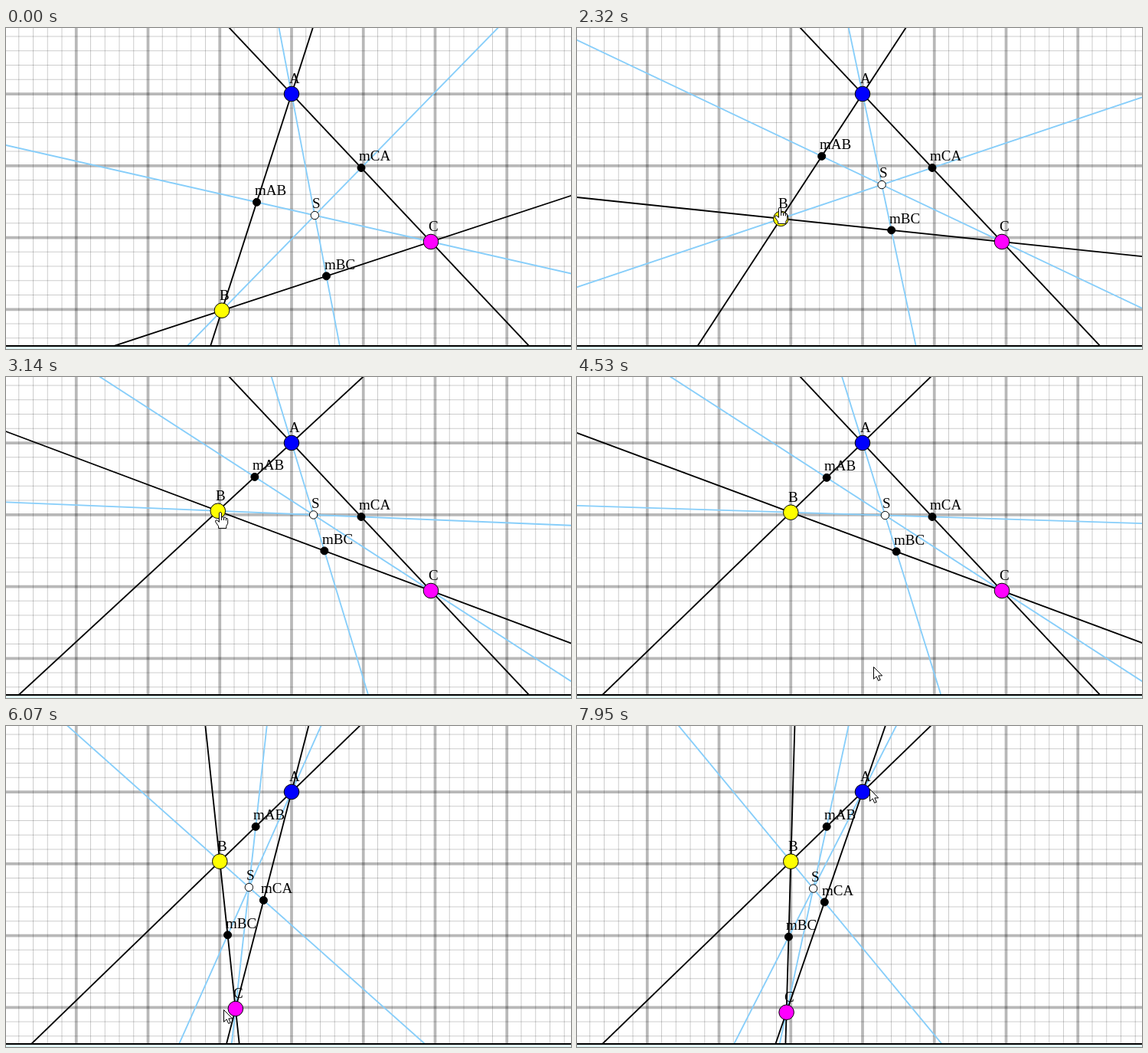
An HTML page with a canvas for the animation above (8000 ms loop, 738 by 419 pixels).

```html
<!DOCTYPE html>
<html lang="en">
<head>
<meta charset="utf-8">
<title>Medians of a triangle</title>
<style>
html, body { margin: 0; width: 100%; height: 100%; overflow: hidden; background: #fff; }
canvas { display: block; }
</style>
</head>
<body>
<canvas id="stage" width="738" height="419"></canvas>
<script>
const W = 738, H = 419, FLOOR = 414, LOOP = 8000, SKY = '#87cefa';
const ctx = document.getElementById('stage').getContext('2d');

const A = [373, 86];

// Each move takes n even steps along a path; moves of B and C are eased drags.
const moves = [
  { from: 900, to: 1340, n: 7, path: [[470, 406], [318, 359], [284, 371]] },
  { from: 1650, hand: true, path: [[284, 362]] },
  { drag: 'B', from: 1960, to: 2760, n: 12, hand: true, path: [[282.9, 369.7], [255.2, 167.3]] },
  { drag: 'B', from: 2840, hand: true, path: [[258, 166.5]] },
  { drag: 'B', from: 2980, to: 3200, n: 4, hand: true, path: [[266.3, 166.8], [279.3, 176.7]] },
  { from: 3360, to: 4160, n: 12, path: [[286, 180], [430, 235], [570, 291], [542, 273]] },
  { from: 4390, to: 4679, n: 5, path: [[500, 303], [387, 378], [300, 390]] },
  { from: 4751, to: 5040, n: 5, path: [[330, 368], [430, 320], [542, 280]] },
  { drag: 'C', from: 5180, to: 5910, n: 11, hand: true, path: [[552, 280], [335, 364]] },
  { drag: 'C', from: 5990, to: 6210, n: 4, path: [[329, 366.5], [265, 372]] },
  { drag: 'C', from: 6440, to: 6520, n: 2, hand: true, path: [[265.5, 372], [267.5, 372.6]] },
  { drag: 'C', from: 6670, hand: true, path: [[273.6, 373.7]] },
  { from: 6980, to: 7280, n: 5, path: [[290, 340], [330, 215], [363, 69]] },
  { from: 7420, to: 7493, n: 2, path: [[354, 72], [351, 78]] },
  { from: 7567, hand: true, path: [[370, 85]] },
  { from: 7640, path: [[384, 80]] },
  { from: 7950, path: [[382, 82]] }
];

// Catmull-Rom curve through the path, u from 0 to 1
function along(path, u) {
  const last = path.length - 1;
  const i = Math.min(Math.floor(u * last), last - 1), f = u * last - i;
  const p = j => path[Math.max(0, Math.min(last, j))];
  if (last < 2) return p(0).map((v, d) => v + (p(last)[d] - v) * u);
  return [0, 1].map(d => {
    const [a, b, c, e] = [p(i - 1)[d], p(i)[d], p(i + 1)[d], p(i + 2)[d]];
    return b + f / 2 * (c - a + f * (2 * a - 5 * b + 4 * c - e + f * (3 * (b - c) + e - a)));
  });
}

const easeOut = u => 1 - (1 - u) ** 1.5;

function stateAt(t) {
  const state = { B: [282, 368.7], C: [555, 279], cursor: null, hand: false };
  for (const { drag, from, to, n = 1, path, hand } of moves) {
    if (t < from) break;
    const gap = n > 1 ? (to - from) / (n - 1) : 1;
    const step = Math.min(n - 1, Math.floor((t - from + 6) / gap));
    const u = k => n > 1 ? Math.min(1, k / (n - 1)) : 0;
    state.hand = hand;
    if (drag) {
      // the pointer runs ahead of the point it drags
      const [x, y] = along(path, easeOut(u(step + 0.7)));
      state[drag] = along(path, easeOut(u(step)));
      state.cursor = [x + 1, y - 0.6];
    } else {
      state.cursor = along(path, u(step));
    }
  }
  return state;
}

const mid = (p, q) => [(p[0] + q[0]) / 2, (p[1] + q[1]) / 2];

function segment(x1, y1, x2, y2, color, width) {
  ctx.strokeStyle = color;
  ctx.lineWidth = width;
  ctx.beginPath();
  ctx.moveTo(x1, y1);
  ctx.lineTo(x2, y2);
  ctx.stroke();
}

function line(p, q, color) {
  const dx = q[0] - p[0], dy = q[1] - p[1], k = 1500 / Math.hypot(dx, dy);
  segment(p[0] - dx * k, p[1] - dy * k, p[0] + dx * k, p[1] + dy * k, color, 1.85);
}

function grid() {
  for (let i = -20; i <= 20; i++) {
    const x = A[0] + i * 18.75, y = A[1] + i * 18.75;
    const style = i % 5 ? ['rgba(0,0,0,.2)', 1] : ['rgba(0,0,0,.28)', 3.75];
    segment(x, 0, x, FLOOR, ...style);
    segment(0, y, W, y, ...style);
  }
}

function dot([x, y], r, fill) {
  ctx.beginPath();
  ctx.arc(x, y, r, 0, 7);
  ctx.fillStyle = fill;
  ctx.fill();
  ctx.strokeStyle = '#000';
  ctx.lineWidth = 1;
  ctx.stroke();
}

function label(text, [x, y], rise) {
  ctx.fillStyle = '#000';
  ctx.fillText(text, Math.round(x - 3), Math.round(y - rise));
}

const arrow = new Path2D('M.5 .5V16.2L4.2 12.8L6.7 18.4L9.2 17.3L6.8 11.9H11.7Z');
const hand = new Path2D('M-1.6 1.4Q0 -.6 1.6 1.4V7Q3.2 5.9 4.5 7.3Q6.2 6.4 7.4 8.2Q9.7 8 9.7 10.5V15.2L7.8 18.6V21.4H-2.4V18.8L-6.3 13.2Q-7 10.4 -4.3 10.9L-1.6 13.4Z');
const knuckles = new Path2D('M1.6 7V11M4.5 7.5V11M7.4 8.4V11.4');

function pointer([x, y], isHand) {
  const shape = isHand ? hand : arrow;
  ctx.save();
  ctx.translate(Math.round(x), Math.round(y));
  ctx.fillStyle = '#fff';
  ctx.strokeStyle = '#000';
  ctx.lineWidth = 1;
  ctx.fill(shape);
  ctx.stroke(shape);
  if (isHand) ctx.stroke(knuckles);
  ctx.restore();
}

function draw(t) {
  const { B, C, cursor, hand } = stateAt(t);
  const middles = { mAB: mid(A, B), mBC: mid(B, C), mCA: mid(C, A) };
  const S = [0, 1].map(d => (A[d] + B[d] + C[d]) / 3);

  ctx.fillStyle = '#fff';
  ctx.fillRect(0, 0, W, H);
  ctx.save();
  ctx.beginPath();
  ctx.rect(0, 0, W, FLOOR);
  ctx.clip();
  grid();

  line(A, middles.mBC, SKY);
  line(B, middles.mCA, SKY);
  line(C, middles.mAB, SKY);
  line(A, B, '#000');
  line(B, C, '#000');
  line(C, A, '#000');

  ctx.font = '19px "Liberation Serif", "Times New Roman", serif';
  for (const name in middles) {
    dot(middles[name], 5, '#000');
    label(name, middles[name], 9.3);
  }
  dot(S, 5.2, '#fff');
  label('S', S, 9.3);
  for (const [name, p, fill] of [['A', A, '#00f'], ['B', B, '#ff0'], ['C', C, '#f0f']]) {
    dot(p, 9.8, fill);
    label(name, p, 13.8);
  }
  ctx.restore();

  ctx.fillStyle = '#000';
  ctx.fillRect(0, FLOOR, W, 2);
  ctx.fillStyle = '#e0fafa';
  ctx.fillRect(0, FLOOR + 2, W, H - FLOOR - 2);

  if (cursor) pointer(cursor, hand);
}

const start = performance.now();
function frame() {
  draw((performance.now() - start) % LOOP);
  requestAnimationFrame(frame);
}
frame();
</script>
</body>
</html>
```
